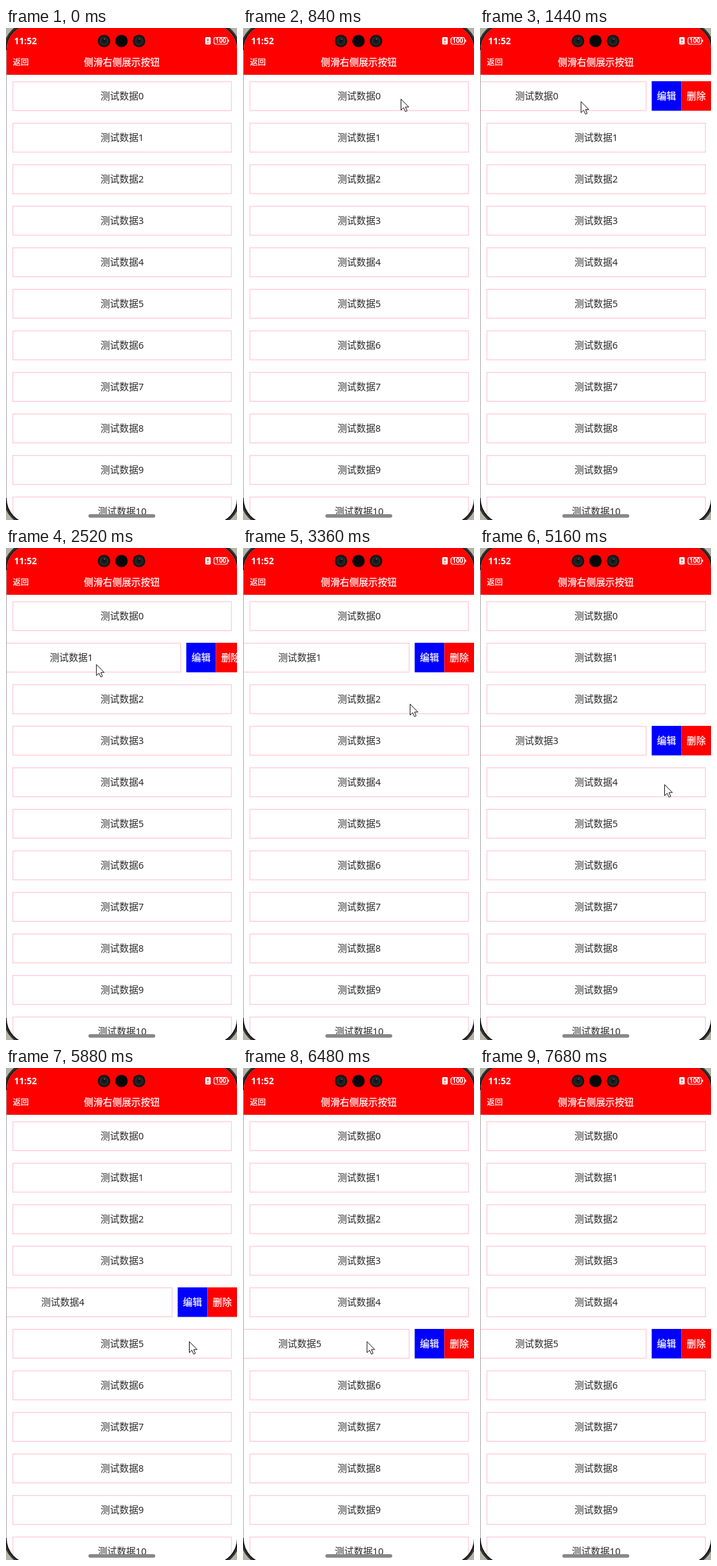
An HTML page that plays this animation: 356x758 px, repeating every 7800 ms.

```html
<!DOCTYPE html>
<html lang="zh-CN">
<head>
<meta charset="utf-8">
<style>
  html, body { margin: 0; width: 100%; height: 100%; overflow: hidden; background: #fff; }
  svg { display: block; width: 356px; height: 758px; }
  text { font: 14.6px "Noto Sans", "Noto Sans CJK SC", sans-serif; text-anchor: middle; fill: #2b2b2b; }
  .light { fill: #fff; stroke: #fff; stroke-width: .25px; }
  .start { text-anchor: start; }
  .time { font-size: 13.6px; font-weight: 600; stroke: none; }
  .back { font-size: 12.3px; }
  .charge { font-size: 10px; font-weight: 700; stroke: none; }
</style>
</head>
<body>
<svg viewBox="0 0 356 758">
  <defs>
    <clipPath id="screen"><rect x="1" y="-5" width="355" height="768" rx="38"/></clipPath>
    <radialGradient id="lens">
      <stop offset="0" stop-color="#0c0e10"/><stop offset=".6" stop-color="#25282a"/><stop offset="1" stop-color="#080808"/>
    </radialGradient>
  </defs>
  <rect width="356" height="758" fill="#b4b5a6"/>
  <rect x="-2" y="-8" width="361" height="774" rx="41" fill="#111" stroke="#333" stroke-width="3"/>
  <path d="M.5 34V724" stroke="#aaa"/>
  <g clip-path="url(#screen)">
    <rect x="1" width="355" height="758" fill="#fff"/>
    <g id="list"></g>
    <rect width="356" height="72" fill="#f00"/>
    <path d="M0 72.5H356" stroke="#f6d6d6"/>
    <text class="light start time" x="12.5" y="25.2">11:52</text>
    <text class="light start back" x="10.5" y="57">返回</text>
    <text class="light" x="178.5" y="57.7">侧滑右侧展示按钮</text>
    <circle cx="151" cy="20" r="9.6" fill="url(#lens)"/>
    <circle cx="178" cy="20" r="9.6" fill="#080808"/>
    <circle cx="205" cy="20" r="9.6" fill="url(#lens)"/>
    <g fill="#888"><circle cx="152" cy="17" r=".8"/><circle cx="206" cy="17" r=".8"/></g>
    <rect x="307" y="14" width="8.5" height="11.5" rx="1.8" fill="#fff"/>
    <path d="M311.2 16.5v4M311.2 22v1.5" stroke="#f00" stroke-width="1.5"/>
    <rect x="320.5" y="14.5" width="21" height="10.5" rx="3" fill="none" stroke="#fff" stroke-width="1.2"/>
    <path d="M343 18v3.5" stroke="#fff" stroke-width="1.5"/>
    <text class="light charge" x="331" y="23.4">100</text>
    <rect x="127" y="749" width="103" height="5.5" rx="2.7" fill="#888"/>
  </g>
  <path id="cursor" d="M0 0V17L4 13.3L6.8 19.3L9.4 18.2L6.8 12.3H12Z" fill="#fff" stroke="#111" stroke-linejoin="round"/>
</svg>
<script>
  const LOOP = 7800, STEP = 120;
  const ROWS = 11, PITCH = 64, BUTTON = 45.7, OPEN = 2 * BUTTON;
  const DRAG = 480, CLOSE = 240, APPEAR = 480, LEAVE = 7200;
  const list = document.getElementById('list');
  const cursor = document.getElementById('cursor');

  const button = (label, color, x) => `
    <rect x="${x}" width="${BUTTON}" height="45.5" fill="${color}"/>
    <text class="light" x="${x + BUTTON / 2}" y="27.7">${label}</text>`;

  const rows = Array.from({ length: ROWS }, (_, i) => {
    list.insertAdjacentHTML('beforeend', `<g>
      <rect x="10.6" y=".6" width="336.8" height="44.6" fill="#fff" stroke="#ffcdd9" stroke-width="1.4"/>
      <text x="179" y="27.7">测试数据${i}</text>
      ${button('编辑', '#00f', 356)}${button('删除', '#f00', 356 + BUTTON)}</g>`);
    return list.lastElementChild;
  });

  // Where and when the pointer presses each successive row.
  const presses = [
    { at: 840, x: 243, y: 109 },
    { at: 2155, x: 217, y: 179 },
    { at: 3360, x: 257, y: 240 },
    { at: 4440, x: 301, y: 305 },
    { at: 5160, x: 284, y: 364 },
    { at: 5880, x: 282, y: 421 }
  ];

  function ease(p) {
    p = Math.min(1, Math.max(0, p));
    return p * p * (3 - 2 * p);
  }

  // A row opens while dragged and closes once the next one is pressed.
  function rowOffset(i, t) {
    if (!presses[i]) return 0;
    const opened = ease((t - presses[i].at) / DRAG);
    const closed = presses[i + 1] ? ease((t - presses[i + 1].at) / CLOSE) : 0;
    return OPEN * (opened - closed);
  }

  // The pointer drags left with the row, then travels to the next press.
  function pointerAt(t) {
    const i = Math.max(0, presses.findLastIndex(press => t >= press.at));
    const from = presses[i], next = presses[i + 1] || from;
    const x = from.x - OPEN * ease((t - from.at) / DRAG);
    if (next === from) return [x, from.y];
    const released = from.at + DRAG;
    const travel = ease((t - released) / (next.at - released));
    return [x + (next.x - x) * travel, from.y + (next.y - from.y) * travel];
  }

  function draw(now) {
    const t = Math.floor(now % LOOP / STEP) * STEP;
    rows.forEach((row, i) => {
      row.setAttribute('transform', `translate(${-rowOffset(i, t)} ${82 + PITCH * i})`);
    });
    const [x, y] = pointerAt(t);
    cursor.setAttribute('transform', `translate(${x + .5} ${y + .5})`);
    cursor.style.display = t >= APPEAR && t < LEAVE ? '' : 'none';
  }

  const start = performance.now();
  function tick() {
    draw(performance.now() - start);
    requestAnimationFrame(tick);
  }
  tick();
</script>
</body>
</html>
```
